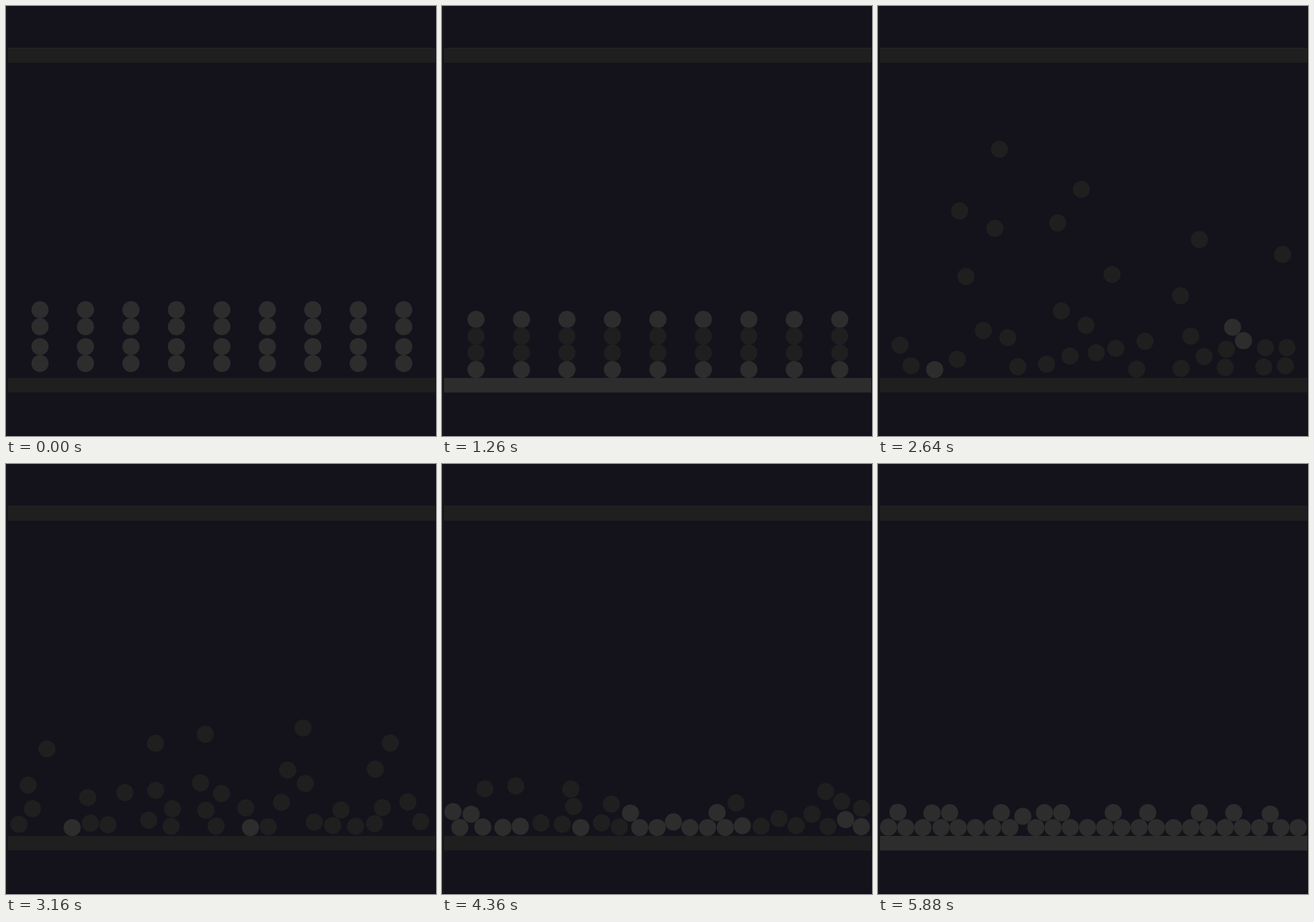
Animation, 637 px wide and 637 px high, one loop 5.9 s. Source, as an HTML page with a canvas:

```html
<!DOCTYPE html>
<html lang="en">
<head>
<meta charset="utf-8">
<title>Bouncing balls</title>
<style>
html, body { margin: 0; width: 100%; height: 100%; overflow: hidden; background: #14131c; }
canvas { display: block; width: 100vw; height: 100vh; }
</style>
</head>
<body>
<canvas id="stage" width="637" height="637"></canvas>
<script>
const ctx = document.getElementById('stage').getContext('2d');
const LOOP = 5900, STEP = 20, BURST = 1260, LATE = 5500;
const R = 12.7, GAP = 25.5;
const LEFT = 15.5, RIGHT = 622.4, CEILING = 97, FLOOR = 538.6;
const G = 1000, SUBSTEPS = 4, PASSES = 6;
const SETTLE = 0.74, BOUNCE = 0.82, CALM = 40, ROLL = 0.995;
const DARK = '#1f1f1f', LIGHT = '#2d2d2d';

let seed = 20;
function random() {
  seed = (seed * 1664525 + 1013904223) % 4294967296;
  return seed / 4294967296;
}

// Four rows drop in pairs until they rest on each other.
const start = [];
for (let col = 0; col < 9; col++) {
  for (let row = 0; row < 4; row++) {
    start.push({
      x: 50.4 + col * 67.35,
      y: FLOOR - (3 - row) * 24.8,
      from: 450 + row * 25 + (row > 1 ? 4.6 : 0),
      outer: row === 0 || row === 3
    });
  }
}

// Height above rest, t seconds after being dropped from d.
function drop(d, t) {
  let half = Math.sqrt(2 * d / G);
  if (t < half) return d - G * t * t / 2;
  t -= half;
  for (let n = 0; n < 20; n++) {
    half *= SETTLE;
    if (t < 2 * half) return G * t * (2 * half - t) / 2;
    t -= 2 * half;
  }
  return 0;
}

function falling(ms) {
  return start.map(p => ({
    x: p.x,
    y: p.y - drop(p.y - p.from, ms / 1000),
    lit: p.outer || ms < 600
  }));
}

const rebound = speed => speed < CALM ? 0 : BOUNCE;

function collide(a, b) {
  const dx = b.x - a.x, dy = b.y - a.y;
  const dist = Math.hypot(dx, dy);
  if (dist >= GAP || dist === 0) return;
  const nx = dx / dist, ny = dy / dist;
  const push = (GAP - dist) / 2;
  a.x -= nx * push; a.y -= ny * push;
  b.x += nx * push; b.y += ny * push;
  const closing = (a.vx - b.vx) * nx + (a.vy - b.vy) * ny;
  if (closing <= 0) return;
  const kick = closing * (1 + rebound(closing)) / 2;
  a.vx -= nx * kick; a.vy -= ny * kick;
  b.vx += nx * kick; b.vy += ny * kick;
}

function contain(p) {
  if (p.x < LEFT || p.x > RIGHT) {
    const inward = p.x < LEFT ? 1 : -1;
    p.x = inward > 0 ? LEFT : RIGHT;
    if (p.vx * inward < 0) p.vx *= -rebound(Math.abs(p.vx));
  }
  if (p.y < CEILING) {
    p.y = CEILING;
    p.vy = Math.abs(p.vy) * BOUNCE;
  }
  if (p.y > FLOOR) {
    p.y = FLOOR;
    if (p.vy > 0) p.vy *= -rebound(p.vy);
    p.vx *= ROLL;
  }
}

function eachPair(list, act) {
  for (let i = 0; i < list.length; i++) {
    for (let j = 0; j < i; j++) act(list[j], list[i]);
  }
}

function advance(balls, dt) {
  for (const p of balls) {
    p.vy += G * dt;
    p.x += p.vx * dt;
    p.y += p.vy * dt;
  }
  for (let n = 0; n < PASSES; n++) {
    eachPair(balls, collide);
    balls.forEach(contain);
  }
}

// A ball is bright while it touches anything.
function snapshot(balls) {
  const shot = balls.map(({ x, y }) => ({
    x, y, lit: y > FLOOR - 0.4 || x < LEFT + 0.4 || x > RIGHT - 0.4
  }));
  eachPair(shot, (a, b) => {
    if (Math.hypot(a.x - b.x, a.y - b.y) < GAP + 0.4) a.lit = b.lit = true;
  });
  return shot;
}

function simulate() {
  const balls = start.map(({ x, y }) => ({
    x, y,
    vx: (random() - 0.5) * 420,
    vy: -330 - 620 * random() ** 1.4
  }));
  const shots = [];
  for (let ms = BURST + STEP; ms < LOOP; ms += STEP) {
    for (let n = 0; n < SUBSTEPS; n++) advance(balls, STEP / 1000 / SUBSTEPS);
    shots.push(snapshot(balls));
  }
  return shots;
}

const flight = simulate();

function box(color, x, y, w, h) {
  ctx.fillStyle = color;
  ctx.fillRect(x, y, w, h);
}

function draw(ms) {
  const balls = ms <= BURST ? falling(ms) : flight[(ms - BURST) / STEP - 1];
  box('#14131c', 0, 0, 637, 637);
  for (const { x, y, lit } of balls) {
    ctx.fillStyle = lit ? LIGHT : DARK;
    ctx.beginPath();
    ctx.arc(x, y, R, 0, 2 * Math.PI);
    ctx.fill();
  }
  const floorLit = (ms > 130 && ms < 1400) || ms > LATE;
  box('#242426', 3, 62, 633, 1);
  box(DARK, 3, 63, 633, 21);
  box(floorLit ? LIGHT : DARK, 3, 551, 633, 21.6);
  box('#17171b', 0, 0, 3, 637);
  box('#101115', 636, 0, 1, 637);
  box('#0d0d12', 0, 636, 637, 1);
}

const began = performance.now();
function frame() {
  const ms = (performance.now() - began) % LOOP;
  draw(Math.floor(ms / STEP) * STEP);
  requestAnimationFrame(frame);
}
draw(0);
requestAnimationFrame(frame);
</script>
</body>
</html>
```
